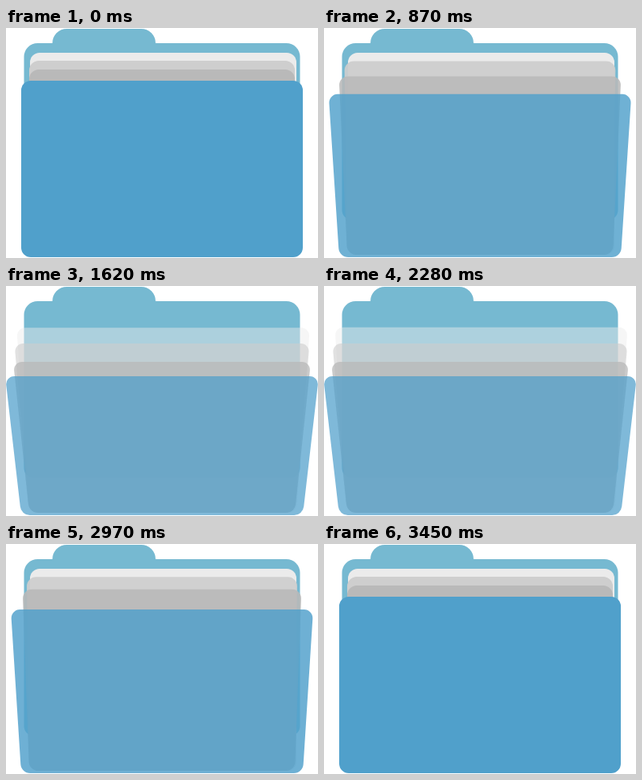
Recreate the animation shown at these times as an HTML page with a canvas. Size 390 by 288 pixels, loop 3990 ms.

```html
<!DOCTYPE html>
<html lang="en">
<head>
<meta charset="utf-8">
<title>Folder</title>
<style>
  html, body { margin: 0; width: 100%; height: 100%; overflow: hidden; background: #fff; }
  canvas { display: block; }
</style>
</head>
<body>
<canvas id="stage" width="390" height="288"></canvas>
<script>
const LOOP = 3990;
const ctx = document.getElementById('stage').getContext('2d');

// Back to front. open / close: [start, duration] in ms.
const leaves = [
  { color: '#ebebeb', cx: 196.5, half: 166.5, top: 31, bottom: 284, drop: 22, flare: 17, fade: 0.55, open: [870, 815], close: [2210, 630] },
  { color: '#cecece', cx: 195, half: 166, top: 41, bottom: 284, drop: 31, flare: 18.5, fade: 0.4, open: [600, 900], close: [2357, 857] },
  { color: '#b9b9b9', cx: 195, half: 166, top: 52, bottom: 284, drop: 43, flare: 20, fade: 0.25, open: [436, 850], close: [2450, 950] },
  { color: '#50a0cb', cx: 195, half: 176, top: 66, bottom: 287, drop: 47, flare: 20, fade: 0.27, open: [364, 850], close: [2622, 850] }
];

// Cubic bezier (.42, 0, .58, 1), solved by bisection.
function easeInOut(p) {
  if (p <= 0) return 0;
  if (p >= 1) return 1;
  let lo = 0, hi = 1, u = 0.5;
  for (let i = 0; i < 20; i++) {
    u = (lo + hi) / 2;
    const x = 1.26 * u * (1 - u) ** 2 + 1.74 * u * u * (1 - u) + u ** 3;
    if (x < p) lo = u; else hi = u;
  }
  return u * u * (3 - 2 * u);
}

const progress = (t, [start, duration]) => easeInOut((t - start) / duration);

// Rounded trapezoid, symmetric around cx.
function panel(cx, topHalf, bottomHalf, top, bottom, rTop, rBottom) {
  ctx.beginPath();
  ctx.moveTo(cx, top);
  ctx.arcTo(cx + topHalf, top, cx + bottomHalf, bottom, rTop);
  ctx.arcTo(cx + bottomHalf, bottom, cx, bottom, rBottom);
  ctx.arcTo(cx - bottomHalf, bottom, cx - topHalf, top, rBottom);
  ctx.arcTo(cx - topHalf, top, cx, top, rTop);
  ctx.closePath();
  ctx.fill();
}

function drawBack() {
  ctx.globalAlpha = 1;
  ctx.fillStyle = '#76b9d1';
  panel(122.5, 64.5, 64.5, 1, 60, 18, 2);
  panel(195, 172.5, 172.5, 19, 240, 17, 12);
}

function drawLeaf(leaf, t) {
  const tilt = progress(t, leaf.open) - progress(t, leaf.close);
  ctx.globalAlpha = 1 - leaf.fade * tilt;
  ctx.fillStyle = leaf.color;
  panel(leaf.cx, leaf.half + leaf.flare * tilt, leaf.half,
    leaf.top + leaf.drop * tilt ** 2.5, leaf.bottom, 12 - 2 * tilt, 12);
}

function frame() {
  const t = performance.now() % LOOP;
  ctx.globalAlpha = 1;
  ctx.fillStyle = '#fff';
  ctx.fillRect(0, 0, 390, 288);
  drawBack();
  leaves.forEach(leaf => drawLeaf(leaf, t));
  requestAnimationFrame(frame);
}
frame();
</script>
</body>
</html>
```
